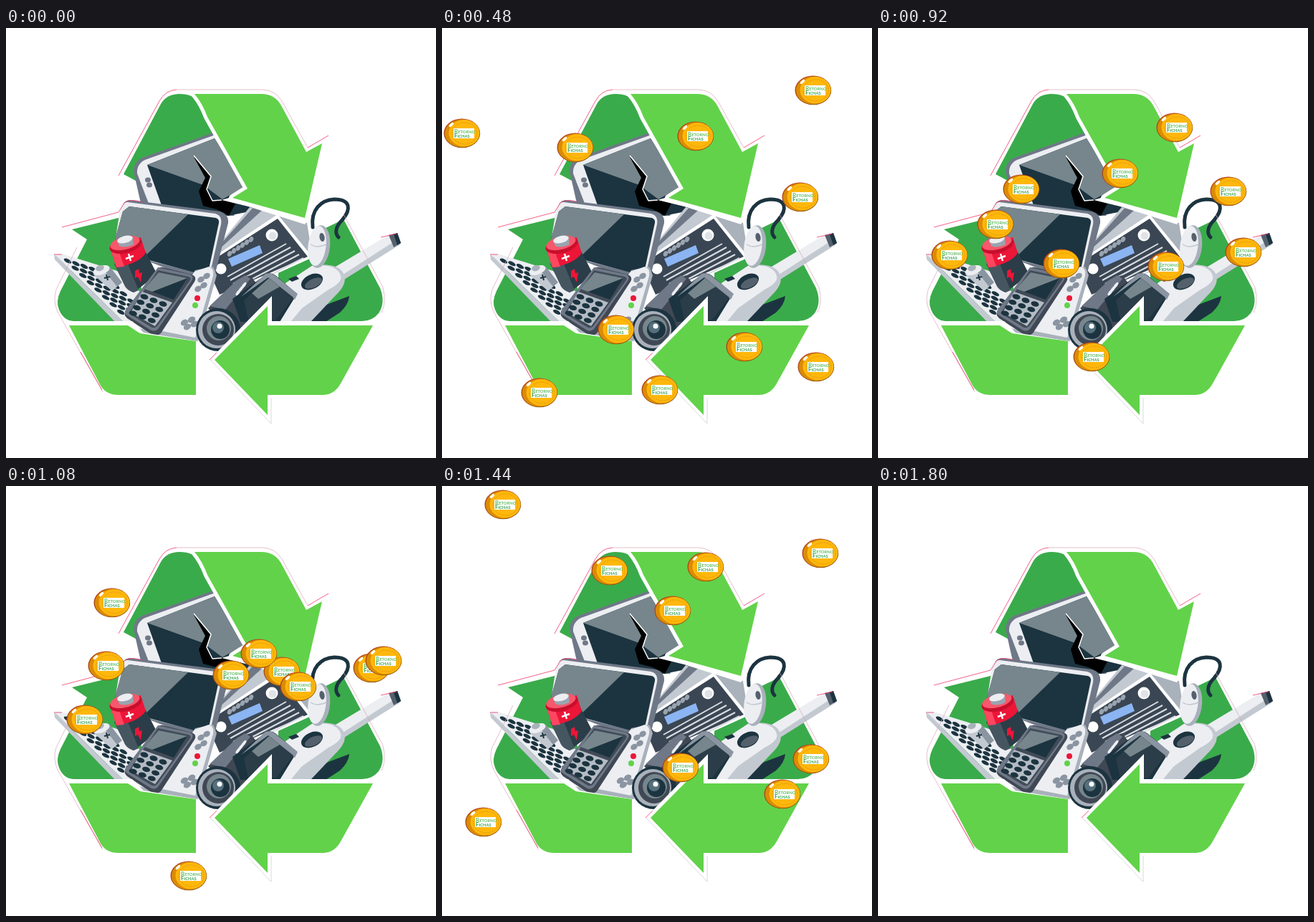
Recreate the animation shown at these times as an HTML page with a canvas. Size 600 by 600 pixels, loop 1880 ms.

```html
<!DOCTYPE html>
<html lang="pt">
<head>
<meta charset="utf-8">
<style>
html, body { margin: 0; width: 100%; height: 100%; overflow: hidden; background: #fff; }
canvas { display: block; width: 600px; height: 600px; }
</style>
</head>
<body>
<canvas id="stage" width="600" height="600"></canvas>
<script>
const LOOP = 1880;
const DARK = '#3aab4a', LIGHT = '#62d24a', NAVY = '#1c3440', SLATE = '#6f7887';
const PALE = '#eceef2', GREY = '#76868c', RED = '#ec1638', FRINGE = '#f2386b';

let pen;

function layer(w, h, draw) {
  const c = document.createElement('canvas');
  c.width = w;
  c.height = h;
  pen = c.getContext('2d');
  pen.lineJoin = 'round';
  draw();
  return c;
}

function fill(color, d) {
  pen.fillStyle = color;
  pen.fill(new Path2D(d));
}

function line(color, width, d, cap = 'butt') {
  pen.strokeStyle = color;
  pen.lineWidth = width;
  pen.lineCap = cap;
  pen.stroke(new Path2D(d));
}

function oval(color, x, y, rx, ry = rx, tilt = 0) {
  pen.fillStyle = color;
  pen.beginPath();
  pen.ellipse(x, y, rx, ry, tilt, 0, Math.PI * 2);
  pen.fill();
}

// Grid of small tilted ovals spanned by two step vectors.
function dots(color, x, y, cols, rows, ux, uy, vx, vy, rx, ry, tilt) {
  for (let r = 0; r < rows; r++)
    for (let c = 0; c < cols; c++)
      oval(color, x + c * ux + r * vx, y + c * uy + r * vy, rx, ry, tilt);
}

function drawBackArrows() {
  fill(DARK, 'M164 204L216 106Q224 92 242 92Q262 92 270 105L340 230L250 250Z');
  fill(DARK, 'M92 281L165 263L200 409H94Q80 408 74 393Q69 382 76 367L113 295Z');
  fill(DARK, 'M440 282L471 267L522 363Q530 383 520 398Q511 409 497 409H380V340Z');
}

function drawTablet() {
  fill(SLATE, 'M190 181L292 145L340 225L318 262H192L178 200Q178 187 190 181Z');
  fill(PALE, 'M194 184L292 149L338 226L315 255H203L183 203Q182 190 194 184Z');
  fill(NAVY, 'M197 191L291 154L338 230L360 252L310 262L218 250Z');
  fill(GREY, 'M197 191L291 154L332 222L302 239L275 219Z');
  oval(SLATE, 198, 212, 4, 3.5);
  oval(SLATE, 200, 219, 4, 3.5);
  fill('#000', 'M261 178L286 207L280 225L288 241L302 239L320 245L311 262L294 253L275 248L269 228L278 209Z');
  line('#fff', 1.5, 'M262 178L286 207L280 225L288 241L301 240');
}

function drawRadio() {
  fill('#c3c9d1', 'M276 328L340 250L382 262L300 318Z');
  fill(SLATE, 'M300 301L348 247L360 252L296 310Z');
  fill('#a9b1bb', 'M379 261L420 272L428 322Z');
  fill('#fff', 'M274 330L379 260L428 320L300 378Z');
  fill('#3a4653', 'M279 330L379 266L421 319L298 372Z');
  for (let i = 0; i < 5; i++) {
    const k = i * 5;
    line('#d9dde2', 2, `M${309 + k * .8} ${347 + k}L${391 + k * 1.2} ${301 + k}`);
  }
  fill('#8bb5f2', 'M310 322L354 303L358 314L315 333Z');
  for (let i = 0; i < 6; i++) oval('#9aa4b0', 312 + i * 6, 315 - i * 4, 3, 4, .5);
  oval('#fff', 371, 289, 8.5);
  oval('#fff', 300, 336, 7.5);
  oval('#dfe3e8', 372, 290, 5.5);
}

function drawVacuum() {
  fill(NAVY, 'M424 410L442 388L479 374Q478 386 466 397L446 410Z');
  fill('#c3c9d1', 'M455 341L536 288L550 302L467 354Z');
  fill(PALE, 'M455 336L535 288L543 297L464 348Z');
  fill('#55606d', 'M534 289L546 286L551 300L541 306Z');
  fill(NAVY, 'M541 288L546 286L551 300L546 303Z');
  fill('#c3c9d1', 'M385 360L428 331Q468 327 472 346Q476 358 459 374L426 409H381Z');
  fill(PALE, 'M390 356L427 332Q462 328 467 346Q470 355 450 365L413 391L398 409H381Z');
  oval(NAVY, 427, 354, 16, 10, -.45);
  oval('#55606d', 429, 356, 13, 6, -.45);
  fill(NAVY, 'M394 350L405 346L409 350L399 354Z');
}

function drawMouse() {
  line(NAVY, 5, 'M428 278C425 254 439 240 458 239C481 239 482 253 469 268C459 278 459 287 464 292', 'round');
  oval('#a9b1bb', 437, 305, 15, 30, .12);
  oval(PALE, 434, 304, 12.5, 28, .12);
  oval('#55606d', 441, 292, 3.5, 6, -.2);
  line('#c3c9d1', 1.5, 'M425 302Q434 308 447 302');
}

function drawLaptop() {
  fill(SLATE, 'M172 240L299 256Q311 260 310 272L291 346L260 350L150 306L160 253Q163 241 172 240Z');
  fill(PALE, 'M170 243L292 259Q302 262 300 274L284 346L150 312L159 254Q162 242 170 243Z');
  fill(NAVY, 'M172 249L293 265Q298 267 297 272L281 346L148 310L163 256Z');
  fill(GREY, 'M172 249L254 260L183 329L148 310L163 256Z');
  fill('#a9b1bb', 'M67 316L158 404L185 425L266 437L280 410L200 400Z');
  fill(PALE, 'M67 315L78 315L155 339L222 400L270 425L262 431L184 419L165 411Z');
  fill('#c3c9d1', 'M67 316L165 411L185 421L178 425L158 416L68 323Z');
  dots(NAVY, 86, 325, 8, 5, 10.6, 10.2, 11.5, 3.8, 5.7, 2.6, .48);
}

function drawConsole() {
  fill('#a9b1bb', 'M264 338L289 333L294 345L268 437L212 427Z');
  fill(PALE, 'M263 340L283 333Q291 336 289 346L264 432L208 421Z');
  dots('#8b95a2', 272, 351, 2, 2, 8, -5, -4, 13, 5, 4, -.5);
  dots('#8b95a2', 249, 411, 2, 2, 10, -4, 4, 6, 5.5, 4, -.5);
  oval(RED, 267, 377, 4);
  oval(LIGHT, 264, 387, 4);
}

function drawBatteries() {
  fill('#8b95a2', 'M122 344L145 333L162 355L148 367Z');
  fill('#c3c9d1', 'M122 344L136 337L155 361L148 367Z');
  oval(PALE, 133, 338, 12, 6, -.35);
  oval('#a9b1bb', 131, 335, 6, 4, -.35);
  line(NAVY, 2, 'M137 349L145 347M140 344L142 352');

  fill('#2b3d48', 'M151 329L194 311L211 344L178 369Q168 365 166 360Z');
  fill('#465661', 'M151 329L168 324L185 366L178 369Q168 365 166 360Z');
  fill(RED, 'M145 306L188 292L195 314Q185 329 154 334Z');
  fill('#ff4660', 'M145 306L158 313L165 333L154 334Z');
  oval('#c80f2d', 167, 303, 23, 11, -.25);
  oval('#f7586b', 166, 300, 21, 9, -.25);
  fill('#9aa4b0', 'M155 296L177 291L178 302Q166 308 158 304Z');
  oval(PALE, 166, 295, 11, 5, -.25);
  line('#fff', 2.5, 'M167 322L178 318M171 315L174 325');
  fill(RED, 'M180 339L185 336L186 342L190 341L188 355L184 347L180 349Z');
}

function drawPhone() {
  fill('#3f4854', 'M211 336Q214 333 219 334L259 344Q267 347 263 354L216 426Q211 431 204 428L169 405Q163 400 168 393Z');
  fill(SLATE, 'M212 334L257 344Q263 347 259 353L212 420Q207 425 201 421L169 401Q163 398 168 392Z');
  fill('#414b58', 'M212 338L255 347Q259 349 257 352L211 416Q207 420 202 417L171 398Z');
  fill(NAVY, 'M213 341L253 349L234 379L193 364Z');
  fill(GREY, 'M213 341L253 349L204 368L193 364Z');
  fill('#b4bbc4', 'M190 368L232 383L208 416L174 397Z');
  dots(NAVY, 193, 375, 3, 4, 13, 5, -5.2, 7.7, 5.6, 3.5, .25);
}

function drawCamera() {
  fill('#3f4854', 'M282 391L325 350L341 345L352 360L338 418L320 427Z');
  fill(SLATE, 'M284 388L322 352L334 345L341 350L306 393Z');
  fill(NAVY, 'M316 378L364 343Q370 341 376 345L406 371L382 410H327Z');
  fill('#8b95a2', 'M362 343Q369 341 375 345L407 371L403 379L366 348L328 375Z');
  fill('#2b3d48', 'M332 380L367 349L401 376L377 407H338Z');
  fill(GREY, 'M343 370L367 349L382 361L352 378Z');
  dots(PALE, 324, 369, 3, 1, 4, -5, 0, 0, 2, 5, .65);
  oval(NAVY, 296, 421, 31, 30);
  oval('#a9b1bb', 294, 421, 26);
  oval('#3f4854', 296, 421, 22);
  oval(GREY, 297, 419, 17);
  oval(NAVY, 299, 421, 13);
  oval('#55707c', 296, 418, 8);
  oval('#fff', 298, 416, 3.5);
}

function drawFrontArrows() {
  fill('#fff', 'M80 409H176L192 425L266 437V530H130Z');
  const top = 'M263 92H356Q375 92 384 108L419 173L441 161L417 265L316 237L337 224L281 124Q274 105 263 92Z';
  line('#fff', 10, top);
  fill('#fff', 'M301 240L318 235L420 269L417 274L338 249Z');
  fill(LIGHT, top);

  fill(LIGHT, 'M88 415H170L187 426L265 437V512H157Q140 512 132 499Z');
  line('#fff', 5, 'M75 411.5H170L187 423');

  fill('#fff', 'M284 463L371 374V409H528V415H512L440 530H370V552Z');
  fill(LIGHT, 'M291 463L365 388V415H512L467 496Q458 512 442 512H365V540Z');
}

function drawFringe() {
  line(FRINGE, .8, 'M157 206L214 102Q222 87 238 86M421 167L450 150M78 278L157 257L166 243Q176 238 190 243');
  line('#d9a4b4', .7, 'M238 86H357Q375 86 385 102L421 167M471 260L526 362M526 362Q531 383 524 397M99 306L70 365Q65 380 72 396L135 508');
  line('#c9c9cc', .7, 'M370 516V552L285 463');
  line(FRINGE, .8, 'M284 463L294 453M67 316L78 316M523 292L545 287M104 452L134 505');
}

function drawScene() {
  drawBackArrows();
  drawTablet();
  drawRadio();
  drawVacuum();
  drawMouse();
  drawLaptop();
  drawConsole();
  drawBatteries();
  drawPhone();
  drawCamera();
  drawFrontArrows();
  drawFringe();
}

function label(word, y, color) {
  pen.fillStyle = color;
  pen.font = 'bold 8px Lato, sans-serif';
  pen.fillText(word[0], -11, y);
  const indent = pen.measureText(word[0]).width;
  pen.font = 'bold 5.8px Lato, sans-serif';
  pen.fillText(word.slice(1), -11 + indent, y);
}

function drawCoin() {
  pen.translate(30, 25);
  oval('#c23a22', -.3, -.3, 25.2, 20.2);
  oval('#8f5710', .2, .2, 25, 20);
  oval('#dc8b05', 0, 0, 24.2, 19.4);
  oval('#ffb70b', 3, -.3, 21.5, 18.6);
  pen.setLineDash([1.5, 1.5]);
  line('#d69008', 1, 'M-14 0A17.5 15 0 0 1 21 0A17.5 15 0 0 1 -14 0');
  pen.setLineDash([]);
  oval('#fff', -15, -12, 4, 1.8, -.75);
  pen.fillStyle = '#fff';
  pen.fillRect(-12, -7, 29, 14);
  label('RETORNO', -.3, '#62bd62');
  label('FICHAS', 6.2, '#35a24c');
}

// Keyed x, y positions of each coin; the last coins are in front.
const KEYS = [0, 5, 8, 10, 13, 16, 20];
const COINS = [
  [[-60, -40], [28, 147], [114, 221], [164, 274], [83, 356], [58, 469], [46, 640]],
  [[105, -40], [186, 167], [276, 187], [338, 203], [407, 295], [475, 430], [500, 640]],
  [[270, -40], [354, 151], [445, 198], [489, 228], [516, 274], [515, 381], [500, 640]],
  [[522, -40], [518, 87], [452, 112], [414, 139], [331, 282], [333, 393], [370, 640]],
  [[150, 690], [136, 509], [107, 394], [100, 317], [164, 219], [234, 118], [270, -40]],
  [[340, 690], [304, 505], [266, 401], [256, 329], [341, 230], [368, 113], [360, -40]],
  [[520, 660], [522, 473], [515, 377], [510, 313], [533, 208], [528, 94], [510, -40]],
  [[390, 660], [422, 445], [421, 376], [402, 333], [403, 253], [322, 174], [290, -40]],
  [[250, 660], [243, 421], [227, 301], [200, 225], [124, 132], [85, 26], [60, -120]],
  [[520, -50], [500, 236], [409, 380], [298, 459], [242, 588], [225, 720], [220, 860]]
];

// Smooth curve through unevenly spaced keys.
function glide(points, axis, t) {
  const last = KEYS.length - 1;
  const slope = i => {
    const a = Math.max(i - 1, 0), b = Math.min(i + 1, last);
    return (points[b][axis] - points[a][axis]) / (KEYS[b] - KEYS[a]);
  };
  let i = 0;
  while (i < last - 1 && t >= KEYS[i + 1]) i++;
  const span = KEYS[i + 1] - KEYS[i], u = (t - KEYS[i]) / span;
  const p = points[i][axis], q = points[i + 1][axis];
  const ease = u * u * (3 - 2 * u);
  return p + (q - p) * ease
    + span * u * (1 - u) * ((1 - u) * slope(i) - u * slope(i + 1));
}

// Each group of four poses lasts 360 ms: 120, 80, 80, 80.
function poseAt(ms) {
  const rest = ms % 360;
  return Math.floor(ms / 360) * 4 + (rest < 120 ? 0 : Math.floor((rest - 40) / 80));
}

const scene = layer(600, 600, drawScene);
const coin = layer(60, 50, drawCoin);
const stage = document.getElementById('stage').getContext('2d');
const start = performance.now();

function render() {
  const pose = poseAt((performance.now() - start) % LOOP);
  stage.fillStyle = '#fff';
  stage.fillRect(0, 0, 600, 600);
  stage.drawImage(scene, 0, 0);
  for (const path of COINS)
    stage.drawImage(coin, Math.round(glide(path, 0, pose)) - 30, Math.round(glide(path, 1, pose)) - 25);
  requestAnimationFrame(render);
}
render();
</script>
</body>
</html>
```
